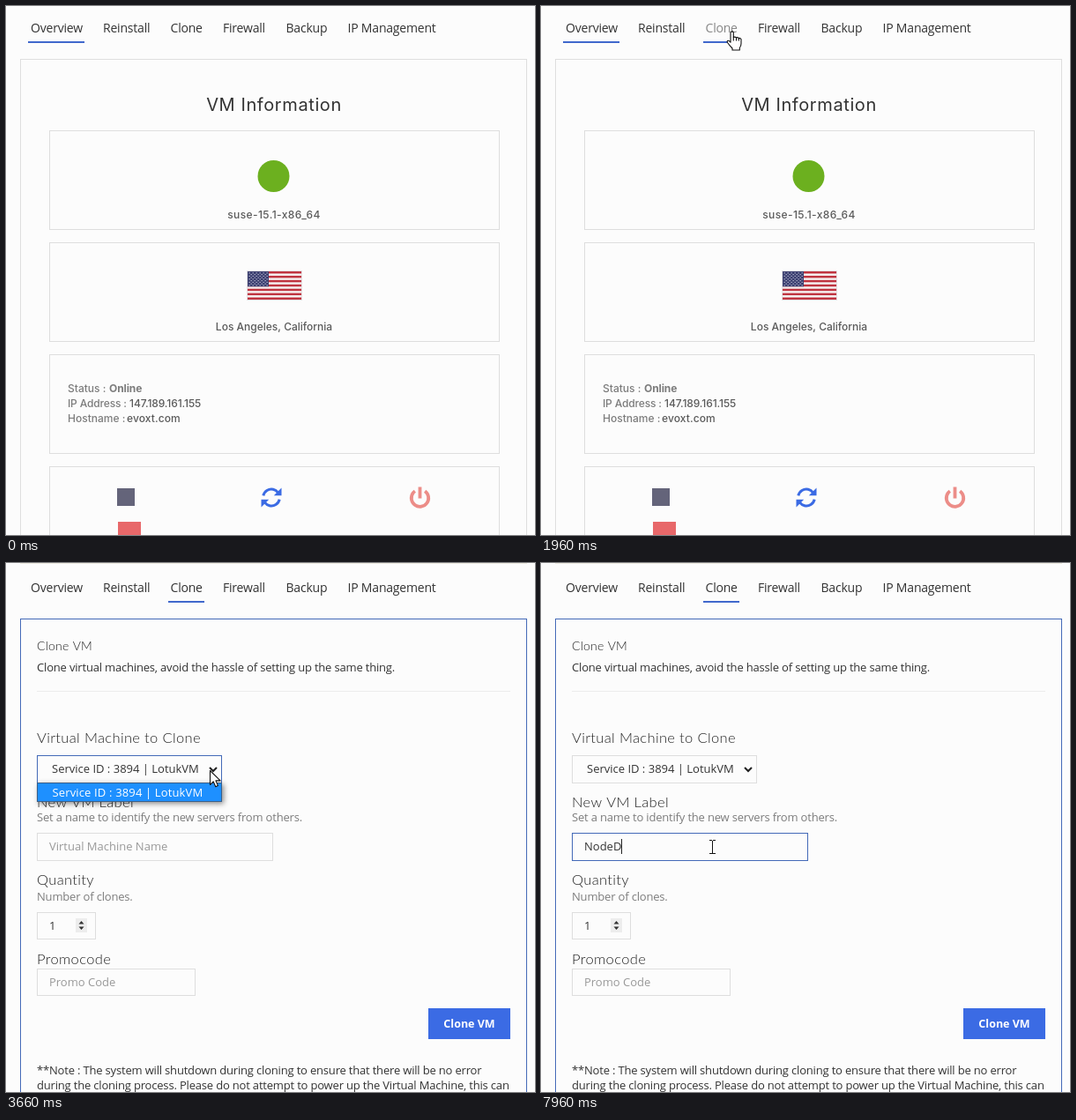
An HTML page with a canvas for the animation above (8 s loop, 600 px wide and 600 px high).

```html
<!DOCTYPE html>
<html lang="en">
<head>
<meta charset="utf-8">
<title>Clone a VM</title>
<style>
html, body { margin: 0; width: 100%; height: 100%; overflow: hidden; background: #fcfcfc; }
canvas { display: block; width: 600px; height: 600px; }
</style>
</head>
<body>
<canvas id="stage" width="600" height="600"></canvas>
<script>
const ctx = document.getElementById('stage').getContext('2d');
const LOOP = 8000;
const SANS = '"Open Sans", sans-serif';
const HEAD = 'Lato, sans-serif';
const GEO = 'Inter, sans-serif';
const BLUE = '#3b6be4', RULE = '#4068cc', LINE = '#dedede', INK = '#333', MUTED = '#7c7c7c';

const T = { hover: 1480, open: 2140, drop: 3620, pick: 4340, overInput: 4620, focus: 5200, clear: 6200 };
const KEYS = [[6280, 'N'], [7220, 'No'], [7680, 'Nod'], [7720, 'Node'], [7960, 'NodeD']];
const MOVES = [
  [20, 330, 604], [820, 266, 130], [1060, 250, 55.5], [1560, 216, 28], [2440, 216, 28],
  [3000, 227, 197], [3260, 232, 234], [3580, 232, 234], [4240, 202, 257],
  [4400, 202, 257], [4720, 194, 322]
];

const ARROW = new Path2D('M0 0V16L3.7 12.4L6.3 18.3L8.9 17.1L6.4 11.4H11.6Z');
const HAND = new Path2D('M-1.5 1.5Q0 -0.8 1.8 1.5V7Q3.5 6 5 7.3Q6.5 6.6 7.8 8Q9.6 7.6 10.5 9.3V14Q10.5 17 8.8 19V21.5H0.5V19.5Q-3 16 -5.3 12.5Q-5.6 10.5 -3.8 10.7Q-2.3 11.2 -1.5 12.8Z');
const FINGERS = new Path2D('M1.8 7V11M5 7.5V11M7.8 8V11');

const clamp = v => Math.max(0, Math.min(1, v));
const fade = (t, start, length = 300) => clamp((t - start) / length);

function mix(a, b, k) {
  const c = a.map((v, i) => Math.round(v + (b[i] - v) * k));
  return `rgb(${c})`;
}
const lineColor = k => mix([222, 222, 222], [68, 106, 184], k);

function text(str, x, y, font, color = INK, spacing = 0, align = 'left') {
  ctx.font = font;
  ctx.fillStyle = color;
  ctx.letterSpacing = spacing + 'px';
  ctx.textAlign = align;
  ctx.fillText(str, x, y);
}

function rect(x, y, w, h, color) {
  ctx.fillStyle = color;
  ctx.fillRect(x, y, w, h);
}

function frame(x, y, w, h, color = LINE) {
  ctx.strokeStyle = color;
  ctx.lineWidth = 1;
  ctx.strokeRect(x + .5, y + .5, w - 1, h - 1);
}

function nav(dy, active, hover) {
  const items = [['Overview', 28], ['Reinstall', 110], ['Clone', 186.5], ['Firewall', 246], ['Backup', 317.5], ['IP Management', 387.5]];
  for (const [name, x] of items) {
    const color = name === 'Clone' ? mix([51, 51, 51], [135, 135, 135], hover) : INK;
    text(name, x, 30 + dy, '14px ' + SANS, color, -.2);
  }
  if (active === 'Overview') rect(25, 40, 64, 2, RULE);
  ctx.globalAlpha = active === 'Clone' ? 1 : hover;
  rect(184, 40 + dy, 41, 2, RULE);
  ctx.globalAlpha = 1;
}

function flag(x, y, w, h) {
  const s = h / 13;
  rect(x - 1, y - 1, w + 2, h + 2, '#e4e2e4');
  rect(x, y, w, h, '#f6f2f2');
  for (let i = 0; i < 13; i += 2) rect(x, y + i * s, w, s, '#bf3440');
  rect(x, y, 24, s * 7, '#3b3f70');
  for (let r = 0; r < 9; r++)
    for (let c = r % 2; c < 11; c += 2)
      rect(x + 1.6 + c * 2, y + 1.3 + r * 1.75, 1.1, 1.1, '#d5d6e6');
}

function refreshIcon(x, y) {
  ctx.save();
  ctx.translate(x, y);
  ctx.strokeStyle = ctx.fillStyle = BLUE;
  ctx.lineWidth = 3;
  for (let i = 0; i < 2; i++) {
    ctx.beginPath();
    ctx.arc(0, 0, 9.4, -Math.PI + .22, -.65);
    ctx.stroke();
    ctx.fill(new Path2D('M11.5 -11V-2.2H2.8Z'));
    ctx.rotate(Math.PI);
  }
  ctx.restore();
}

function powerIcon(x, y) {
  ctx.strokeStyle = '#ec8d88';
  ctx.lineWidth = 3.8;
  ctx.beginPath();
  ctx.arc(x, y + .6, 9.7, -Math.PI / 2 + .62, Math.PI * 1.5 - .62);
  ctx.moveTo(x, y - 12);
  ctx.lineTo(x, y + 1);
  ctx.stroke();
}

function overview(t) {
  nav(0, 'Overview', fade(t, T.hover));
  frame(16, 60, 575, 560, lineColor(fade(t, 20) * (1 - fade(t, 1080))));
  text('VM Information', 304, 119, '400 20px ' + GEO, INK, .6, 'center');
  for (let i = 0; i < 4; i++) frame(49, 141 + i * 127, 511, 113);

  ctx.fillStyle = '#6cb01f';
  ctx.beginPath();
  ctx.arc(303.5, 193, 18, 0, 7);
  ctx.fill();
  const small = '500 12px ' + GEO, value = '#5a5a5a';
  text('suse-15.1-x86_64', 304, 241, small, value, .4, 'center');
  flag(274, 301, 61, 32);
  text('Los Angeles, California', 304, 368, small, value, 0, 'center');

  text('Status :', 70, 438, small, MUTED);
  text('Online', 117, 438, '700 12px ' + GEO, MUTED, -.1);
  text('IP Address :', 70, 455, small, MUTED, -.15);
  text('147.189.161.155', 140, 455, small, value, -.1);
  text('Hostname :', 70, 472, small, MUTED);
  text('evoxt.com', 137, 472, small, value, .1);

  rect(126, 547, 20, 20, '#64647a');
  refreshIcon(301, 557.5);
  powerIcon(469.5, 557.5);
  rect(127, 585, 26, 26, '#e8686a');
}

function chevron(x, y) {
  ctx.strokeStyle = '#222';
  ctx.lineWidth = 2;
  ctx.stroke(new Path2D(`M${x - 4} ${y - 2}L${x} ${y + 2}L${x + 4} ${y - 2}`));
}

function spinner(x, y) {
  rect(x, y, 13, 16, '#ededed');
  ctx.fillStyle = '#333';
  ctx.fill(new Path2D(`M${x + 3.5} ${y + 6.5}h6l-3 -3.5zM${x + 3.5} ${y + 9.5}h6l-3 3.5z`));
}

function labelInput(t, font) {
  frame(35, 306, 268, 32, lineColor(fade(t, T.overInput, 100)));
  let typed = '', last = T.focus;
  for (const [at, str] of KEYS) if (t >= at) { typed = str; last = at; }
  if (t < T.clear) text('Virtual Machine Name', 49, 326, font, '#999');
  else text(typed, 49, 326, font, INK);
  const blink = last === KEYS[0][0] ? 520 : 500;
  if (t >= T.focus && Math.floor((t - last) / blink) % 2 === 0) {
    ctx.font = font;
    ctx.letterSpacing = '0px';
    rect(Math.round(49 + ctx.measureText(typed).width), 313, 1, 17, '#222');
  }
}

function clonePage(t) {
  const field = '13px ' + SANS;
  const body = (str, y, color) => text(str, 35, y, field, color, -.18);
  const title = (str, y) => text(str, 35, y, '300 16.5px ' + HEAD, '#222', .35);
  const service = 'Service ID : 3894 | LotukVM';
  rect(16, 0, 575, 1, '#ebe9df');
  nav(3, 'Clone', 1 - fade(t, 2500));
  frame(16, 63, 575, 560, lineColor(fade(t, 2600)));

  text('Clone VM', 35, 99, '300 14px ' + HEAD, '#222', .25);
  body('Clone virtual machines, avoid the hassle of setting up the same thing.', 123);
  rect(35, 145, 537, 1, '#ececec');

  title('Virtual Machine to Clone', 204);
  frame(35, 218, 210, 32, lineColor(fade(t, 3150, 150) * (1 - fade(t, T.focus, 1))));
  text(service, 52, 238, field);
  chevron(235, 234);

  title('New VM Label', 277);
  body('Set a name to identify the new servers from others.', 293, MUTED);
  labelInput(t, field);

  title('Quantity', 365);
  body('Number of clones.', 383, MUTED);
  frame(35, 396, 67, 31);
  text('1', 49, 416, field);
  spinner(79, 403);

  title('Promocode', 455);
  frame(35, 460, 180, 31);
  text('Promo Code', 49, 480, field, '#999');

  rect(479, 505, 93, 35, BLUE);
  text('Clone VM', 525.5, 527, '700 12.5px ' + SANS, '#fff', 0, 'center');
  body('**Note : The system will shutdown during cloning to ensure that there will be no error', 580);
  body('during the cloning process. Please do not attempt to power up the Virtual Machine, this can', 597);

  if (t >= T.drop && t < T.pick) {
    ctx.shadowColor = 'rgba(0, 0, 0, .45)';
    ctx.shadowBlur = 6;
    ctx.shadowOffsetX = ctx.shadowOffsetY = 2;
    rect(35, 249, 210, 22, '#3a5f88');
    ctx.shadowColor = 'transparent';
    rect(36, 250, 208, 20, '#1e90ff');
    text(service, 52.5, 265, field, '#fff', .15);
  }
}

function pointerAt(t) {
  let a = MOVES[0];
  for (const b of MOVES) {
    if (t < b[0]) {
      const k = clamp((t - a[0]) / (b[0] - a[0] || 1));
      const e = k * k * (3 - 2 * k);
      return [a[1] + (b[1] - a[1]) * e, a[2] + (b[2] - a[2]) * e];
    }
    a = b;
  }
  return [a[1], a[2]];
}

function pointer(t) {
  if (t < 20) return;
  const [x, y] = pointerAt(t);
  ctx.save();
  ctx.translate(Math.round(x), Math.round(y));
  if (t >= T.overInput) {
    rect(0, -7, 1, 15, '#111');
    for (const edge of [-8, 7]) {
      rect(-3, edge, 3, 1, '#111');
      rect(1, edge, 3, 1, '#111');
    }
  } else {
    const hand = t >= T.hover && t < 2530;
    const shape = hand ? HAND : ARROW;
    ctx.translate(.5, .5);
    ctx.lineWidth = 1.1;
    ctx.lineJoin = 'round';
    ctx.fillStyle = '#fff';
    ctx.strokeStyle = '#111';
    ctx.fill(shape);
    ctx.stroke(shape);
    if (hand) ctx.stroke(FINGERS);
  }
  ctx.restore();
}

function draw(now) {
  const t = now % LOOP;
  rect(0, 0, 600, 600, '#fcfcfc');
  if (t < T.open) overview(t);
  else clonePage(t);
  pointer(t);
  requestAnimationFrame(draw);
}
requestAnimationFrame(draw);
</script>
</body>
</html>
```
